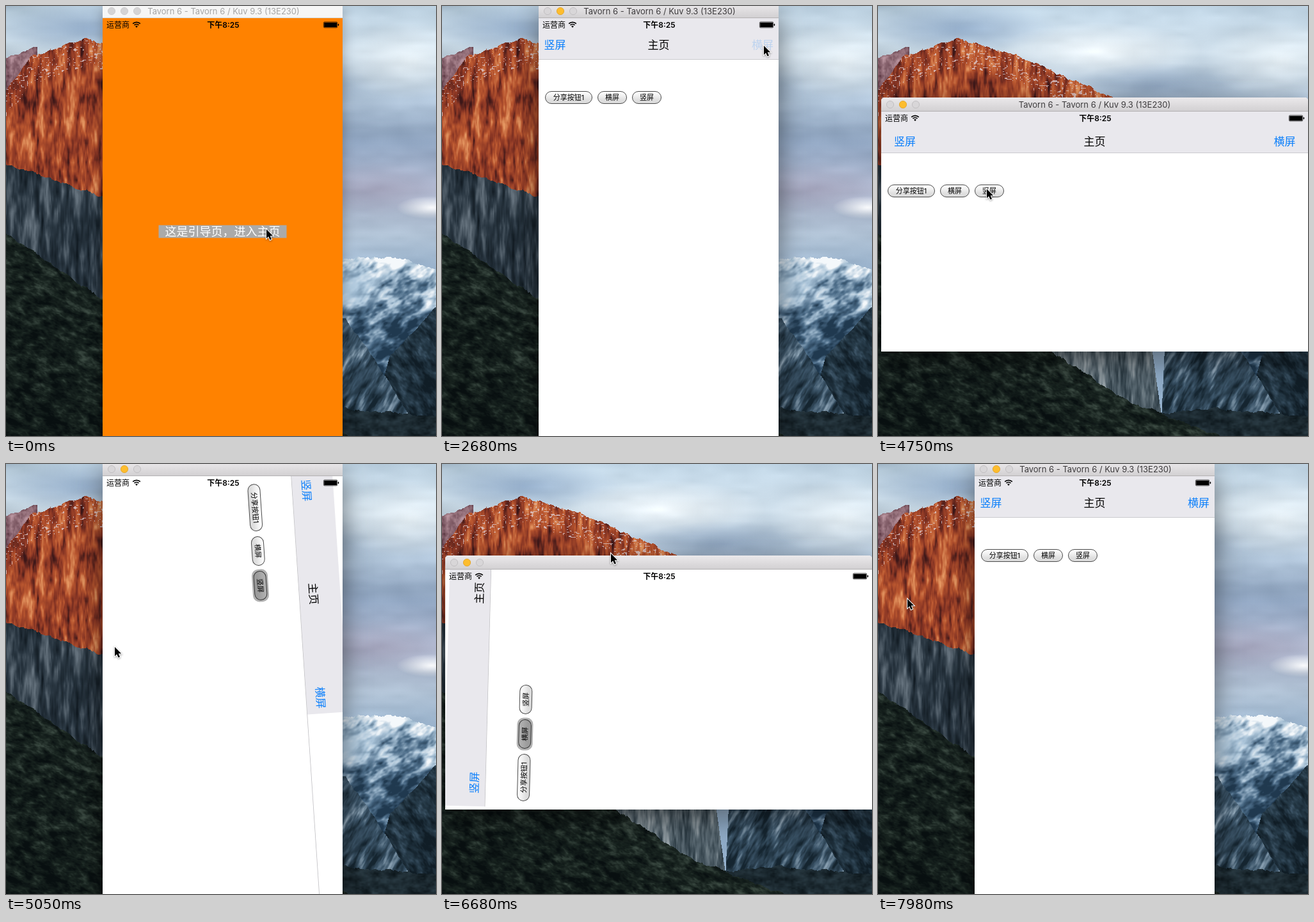
These frames come from a looping animation (672x672 px, 8 s). An HTML page with a canvas:

```html
<!DOCTYPE html>
<html lang="zh">
<head>
<meta charset="utf-8">
<style>
html, body { margin: 0; width: 100%; height: 100%; overflow: hidden; }
canvas { display: block; width: 100vw; height: 100vh; }
</style>
</head>
<body>
<canvas id="stage" width="672" height="672"></canvas>
<script>
const SIZE = 672, LOOP = 8000, LEAD_IN = 590, STEP = 147.8;
const FONT = "Inter, 'Noto Sans CJK SC', 'Noto Sans CJK', sans-serif";
const TITLE = 'Tavorn 6 - Tavorn 6 / Kuv 9.3 (13E230)';
const ctx = document.getElementById('stage').getContext('2d');

// The screen refreshes in even steps after the lead-in; all times below count steps.
const TURNS = [
  { at: 15, lead: 94, wide: true },
  { at: 30, lead: 53, wide: false, held: 2 },
  { at: 41, lead: 33, wide: true, held: 1 },
  { at: 49, lead: 270, wide: false }
];
const MOVES = [
  { from: 7, to: 13, x: 503, y: 62 },
  { from: 15, to: 20, x: 80, y: 206 },
  { from: 20, to: 23, x: 121, y: 263 },
  { from: 23, to: 26, x: 172, y: 288 },
  { from: 26, to: 28, x: 170, y: 286 },
  { from: 30, to: 37, x: 264, y: 140 },
  { from: 41, to: 47, x: 46, y: 211 }
];
const BUTTONS = [['分享按钮1', 10, 74], ['横屏', 92, 46], ['竖屏', 146, 46]];

const clamp = v => Math.min(1, Math.max(0, v));
const mix = (a, b, k) => a + (b - a) * k;
const ease = u => (1 - Math.cos(Math.PI * clamp(u))) / 2;

function pointerAt(step) {
  let x = 407, y = 349;
  for (const m of MOVES) {
    const k = ease((step - m.from) / (m.to - m.from));
    x = mix(x, m.x, k);
    y = mix(y, m.y, k);
  }
  return [x, y];
}

function fade(c, y0, y1, ...colors) {
  const g = c.createLinearGradient(0, y0, 0, y1);
  colors.forEach((col, i) => g.addColorStop(i / (colors.length - 1), col));
  return g;
}

// ---- Wallpaper: layered ridges shaded with noise ----

function hash(x, y) {
  const s = Math.sin(x * 127.1 + y * 311.7) * 43758.5453;
  return s - Math.floor(s);
}

function noise(x, y) {
  const i = Math.floor(x), j = Math.floor(y);
  const u = x - i, v = y - j;
  return mix(mix(hash(i, j), hash(i + 1, j), u), mix(hash(i, j + 1), hash(i + 1, j + 1), u), v);
}

const grain = (x, y) => noise(x, y) * 0.5 + noise(x * 2.1, y * 2.1) * 0.3 + noise(x * 4.3, y * 4.3) * 0.2;

function edgeAt(pts, x) {
  let i = 1;
  while (i < pts.length - 1 && pts[i][0] < x) i++;
  const [x0, y0] = pts[i - 1], [x1, y1] = pts[i];
  return mix(y0, y1, clamp((x - x0) / (x1 - x0)));
}

const rgb = hex => [1, 3, 5].map(i => parseInt(hex.slice(i, i + 2), 16));

function ramp(shades, v) {
  const f = clamp(v) * (shades.length - 1), i = Math.min(shades.length - 2, Math.floor(f));
  return shades[i].map((a, n) => mix(a, shades[i + 1][n], f - i));
}

// Back to front; sx, sy: grain size, slant: shear, fall: darkening with depth
const RIDGES = [
  { edge: [[0, 80], [48, 64], [60, 700]], shades: ['#5e3a45', '#bd98a2'], sx: 8, sy: 12 },
  { edge: [[0, 130], [38, 80], [120, 50], [215, 75], [370, 145], [420, 700]],
    shades: ['#3c1718', '#8a3624', '#b9562f', '#e39560'], sx: 7, sy: 30, snow: 42 },
  { edge: [[0, 247], [60, 266], [151, 298], [300, 700]],
    shades: ['#0e171e', '#2a3742', '#65727d'], sx: 8, sy: 48 },
  { edge: [[500, 700], [526, 398], [550, 391], [625, 396], [672, 413]],
    shades: ['#20394f', '#4d6d89', '#a9c2d6', '#f4f8fb'], sx: 17, sy: 15, slant: 0.6, fall: 0.005, lift: 0.3 },
  { edge: [[555, 700], [600, 548], [672, 470]],
    shades: ['#101d26', '#263a48', '#4b6479'], sx: 10, sy: 14, slant: -0.5, fall: 0.002 },
  { edge: [[440, 700], [450, 480], [530, 490], [562, 530], [660, 690]],
    shades: ['#152530', '#3d566a', '#9fb5c6'], sx: 9, sy: 26, slant: 0.5, fall: 0.002 },
  { edge: [[270, 530], [425, 520], [450, 690]],
    shades: ['#22313a', '#5b6a73', '#a3adb2'], sx: 7, sy: 40 },
  { edge: [[400, 640], [520, 628], [672, 642]], shades: ['#0d171c', '#2b3c45'], sx: 14, sy: 10 },
  { edge: [[0, 355], [151, 458], [380, 612], [580, 690]],
    shades: ['#080f10', '#18231f', '#3b4a42'], sx: 11, sy: 8, slant: -0.7, fall: 0.0008 }
];

function paintWallpaper() {
  const cv = document.createElement('canvas');
  cv.width = cv.height = SIZE;
  const c = cv.getContext('2d');
  c.fillStyle = fade(c, 0, 430, '#b9cede', '#c9d9e5', '#b0c4d8', '#93a8c4', '#a3acc3', '#b3c5d8', '#9ab6d2');
  c.fillRect(0, 0, SIZE, SIZE);

  function cloud(x, y, rx, ry, tone, a) {
    c.save();
    c.translate(x, y);
    c.scale(rx, ry);
    const g = c.createRadialGradient(0, 0, 0, 0, 0, 1);
    g.addColorStop(0, `rgba(${tone},${a})`);
    g.addColorStop(1, `rgba(${tone},0)`);
    c.fillStyle = g;
    c.fillRect(-1, -1, 2, 2);
    c.restore();
  }
  cloud(130, 35, 150, 40, '152,178,208', 0.9);
  cloud(345, 70, 160, 45, '236,243,247', 1);
  cloud(440, 125, 140, 36, '142,164,190', 0.9);
  cloud(630, 85, 120, 60, '230,239,244', 0.9);
  cloud(580, 285, 120, 42, '150,146,170', 0.6);
  cloud(665, 315, 55, 18, '245,246,248', 1);

  for (const r of RIDGES) r.tones = r.shades.map(rgb);
  const img = c.getImageData(0, 0, SIZE, SIZE), d = img.data;
  for (let x = 0; x < SIZE; x++) {
    const jag = (grain(x / 9, 3) - 0.5) * 10;
    const tops = RIDGES.map(r => edgeAt(r.edge, x) + jag);
    for (let y = 0; y < SIZE; y++) {
      const i = (y * SIZE + x) * 4;
      let k = RIDGES.length - 1;
      while (k >= 0 && y < tops[k]) k--;
      if (k < 0) {
        const puff = (grain(x / 120, y / 38) - 0.5) * 50;
        for (let n = 0; n < 3; n++) d[i + n] += puff;
        continue;
      }
      const { tones, sx, sy, slant = 0, fall = 0, lift = 0, snow = 0 } = RIDGES[k];
      const depth = y - tops[k];
      const g = grain((x + y * slant) / sx, y / sy);
      let col = ramp(tones, 0.48 + (g - 0.5) * 1.7 + lift - depth * fall);
      if (depth < snow) {
        const fleck = noise(x / 3, y / 2) > 0.78 ? 0.75 : 0;
        col = ramp([col, [222, 208, 214]], fleck);
      }
      for (let n = 0; n < 3; n++) d[i + n] = col[n];
    }
  }
  c.putImageData(img, 0, 0);
  cloud(530, 440, 70, 42, '176,202,223', 1);
  return cv;
}

const wallpaper = paintWallpaper();

// ---- Window ----

function text(s, x, cy, size, color, align = 'left', weight = 400) {
  ctx.font = `${weight} ${size}px ${FONT}`;
  ctx.textAlign = align;
  ctx.fillStyle = color;
  ctx.fillText(s, x, cy + size * 0.37);
}

function pill(x, y, w, h, r) {
  ctx.beginPath();
  ctx.roundRect(x, y, w, h, r);
}

function drawFrame({ x, y, w, h, wide }, active, titled) {
  const top = y - 22;
  ctx.save();
  ctx.shadowColor = active ? 'rgba(0,0,0,.5)' : 'rgba(0,0,0,.3)';
  ctx.shadowBlur = active ? 42 : 20;
  ctx.shadowOffsetY = active ? 14 : 6;
  ctx.fillStyle = '#fff';
  pill(x, top, w, h + 22, [5, 5, 0, 0]);
  ctx.fill();
  ctx.restore();
  ctx.fillStyle = active ? fade(ctx, top, y, '#ebe9eb', '#d1cfd1') : '#f6f6f6';
  pill(x, top, w, 22, [5, 5, 0, 0]);
  ctx.fill();
  ctx.fillStyle = active ? '#b3b1b3' : '#d6d6d6';
  ctx.fillRect(x, y - 1, w, 1);
  for (let i = 0; i < 3; i++) {
    const lit = active && i === 1;
    ctx.beginPath();
    ctx.arc(x + 14 + i * 20, y - 11, 5.6, 0, 7);
    ctx.fillStyle = lit ? '#fdbd2e' : active ? '#d8d6d8' : '#d5d4d5';
    ctx.strokeStyle = lit ? '#e3a42a' : active ? '#bfbdbf' : '#cbcacb';
    ctx.lineWidth = 0.9;
    ctx.fill();
    ctx.stroke();
  }
  if (titled) text(TITLE, x + w / 2 + (wide ? 0 : 1.5), y - 10.5, 13, active ? '#3d3b3d' : '#a5a5a5', 'center');
}

function drawStatus({ x, y, w }) {
  text('运营商', x + 6, y + 10.5, 12, '#000');
  text('下午8:25', 339.5, y + 10.5, 12, '#000', 'center', 600);
  ctx.strokeStyle = ctx.fillStyle = '#000';
  const cx = x + 53, cy = y + 14.5;
  ctx.lineWidth = 1.7;
  for (const r of [5, 8.2]) {
    ctx.beginPath();
    ctx.arc(cx, cy, r, -Math.PI * 0.75, -Math.PI * 0.25);
    ctx.stroke();
  }
  ctx.beginPath();
  ctx.moveTo(cx, cy + 0.5);
  ctx.arc(cx, cy, 2.6, -Math.PI * 0.75, -Math.PI * 0.25);
  ctx.fill();
  const bx = x + w - 30;
  ctx.lineWidth = 0.7;
  pill(bx + 0.4, y + 5.9, 21.4, 9, 1.5);
  ctx.stroke();
  ctx.fillRect(bx + 1.2, y + 6.8, 19.8, 7.3);
  pill(bx + 22.6, y + 8.7, 1.6, 3.4, 0.8);
  ctx.fill();
}

function drawButton([label, x, w], held) {
  const y = 114;
  ctx.fillStyle = fade(ctx, y, y + 20, '#ffffff', '#f3f3f3', '#e0e0e0', '#d9d9d9');
  ctx.strokeStyle = '#4a4a4a';
  ctx.lineWidth = 1;
  pill(x + 0.5, y + 0.5, w - 1, 19, 9.5);
  ctx.fill();
  ctx.stroke();
  text(label, x + w / 2, y + 10, 11, '#000', 'center');
  if (held) {
    ctx.fillStyle = 'rgba(0,0,0,.3)';
    pill(x - 2.5, y - 2.5, w + 5, 25, 10);
    ctx.fill();
  }
}

function drawGuide() {
  ctx.fillStyle = '#ff8200';
  ctx.fillRect(0, 0, SIZE, SIZE);
  ctx.fillStyle = '#aaaaaa';
  ctx.fillRect(238.5, 342.5, 200, 20);
  text('这是引导页，进入主页', 338.5, 352.5, 18, '#fff', 'center');
}

// Home screen, with its own top left corner at 0, 0
function drawHome({ w, h, wide }, step, held) {
  const pale = step < 4 || (step > 15 && step < 23);
  const pad = wide ? 20 : 8.5, cy = wide ? 47 : 42;
  const link = pressedAt => step === pressedAt ? 'rgba(14,128,252,.2)' : '#0b7ffb';
  ctx.fillStyle = '#fff';
  ctx.fillRect(0, 0, w, h);
  ctx.fillStyle = pale ? '#efeef0' : '#e9e8ed';
  ctx.fillRect(0, 0, w, 64);
  ctx.fillStyle = '#bfbec2';
  ctx.fillRect(0, 64, w + 320, 0.8);
  text('竖屏', pad, cy, 17, link(48));
  text('主页', w / 2, cy, 17, '#000', 'center', 500);
  text('横屏', w - pad + 0.5, cy, 17, link(14), 'right');
  BUTTONS.forEach((b, i) => drawButton(b, i === held));
}

function drawPointer(x, y) {
  const arrow = new Path2D('M0 0V14.2L3.2 11.2 5.6 16.6 8 15.5 5.7 10.3H10.2Z');
  ctx.save();
  ctx.translate(x, y);
  ctx.shadowColor = 'rgba(0,0,0,.4)';
  ctx.shadowBlur = 3;
  ctx.shadowOffsetY = 1;
  ctx.lineWidth = 2;
  ctx.strokeStyle = '#fff';
  ctx.stroke(arrow);
  ctx.shadowColor = 'transparent';
  ctx.fillStyle = '#000';
  ctx.fill(arrow);
  ctx.restore();
}

function draw(time) {
  const step = Math.floor((time - LEAD_IN) / STEP + 0.001);
  const turn = TURNS.filter(k => step >= k.at).pop();
  const wide = !!turn && turn.wide;
  const win = wide ? { x: 5, y: 165, w: 667, h: 375, wide } : { x: 151, y: 19, w: 375, h: 667, wide };
  const p = turn ? ease(((step - turn.at) * STEP + turn.lead) / 400) : 1;
  const { x, y, w, h } = win;

  ctx.drawImage(wallpaper, 0, 0);
  drawFrame(win, step >= 0, p === 1);

  ctx.save();
  ctx.beginPath();
  ctx.rect(x, y, w, h);
  ctx.clip();
  if (step < 6) drawGuide();
  if (step > 0) {
    const slide = step < 6 ? 667 * Math.exp(0.47 - step * 1.5) : 0;
    const side = wide ? 1 : -1, rest = 1 - p;
    ctx.translate(x + w / 2, y + h / 2 + slide);
    ctx.rotate(-side * rest * Math.PI / 2);
    ctx.translate(side * 146 * rest - w / 2, -side * 146 * rest - h / 2);
    drawHome(win, step, turn && step === turn.at ? turn.held : -1);
  }
  ctx.restore();

  drawStatus(win);
  drawPointer(...pointerAt(step));
}

const begin = performance.now();
function tick() {
  draw((performance.now() - begin) % LOOP);
  requestAnimationFrame(tick);
}
tick();
</script>
</body>
</html>
```
